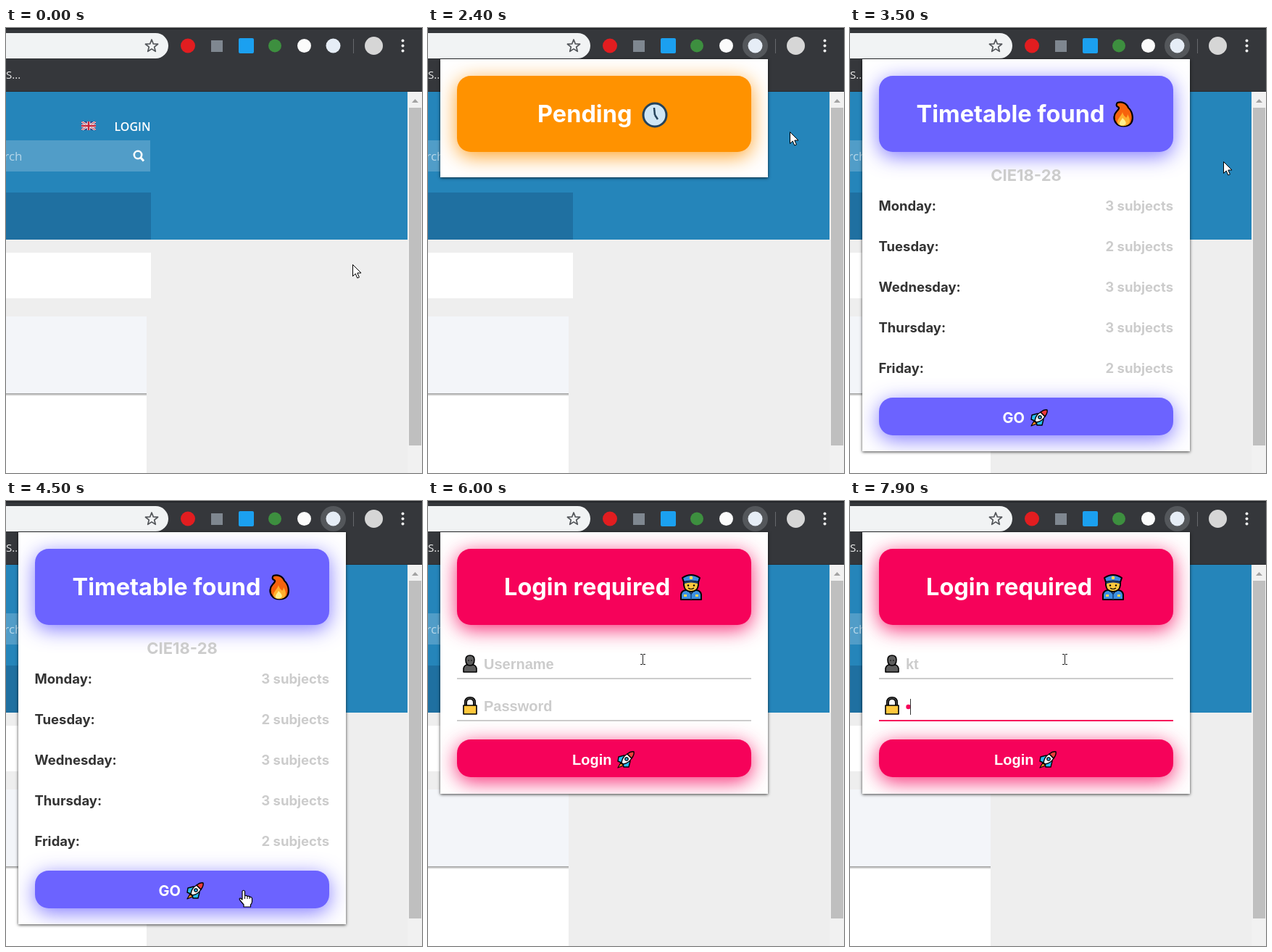
An HTML page with a canvas that plays this animation: 574x614 px, repeating every 8 s.

```html
<!DOCTYPE html>
<html lang="en">
<head>
<meta charset="utf-8">
<title>Timetable popup</title>
<style>
html, body { margin: 0; width: 100%; height: 100%; overflow: hidden; background: #eee; }
canvas { display: block; }
</style>
</head>
<body>
<canvas id="stage" width="574" height="614"></canvas>
<script>
const W = 574, H = 614, LOOP = 8000;
const stage = document.getElementById('stage').getContext('2d');
const sheet = document.createElement('canvas');
sheet.width = W;
sheet.height = H;
const popup = sheet.getContext('2d');
let c = stage;

const ORANGE = [255, 146, 0], VIOLET = [108, 99, 255], PINK = [246, 2, 90];
const GREY = '#cccccc';
const OPEN = 1400, FOUND = 2500, LOGIN = 4700;
const USER_FOCUS = 6500, PASS_FOCUS = 7500, PASS_KEY = 7800;
const USER_KEYS = [6900, 7100], USER = 'kt';

// time, x, y of the pointer's hot spot
const MOVES = [
  [0, 478, 326], [300, 478, 326], [850, 452, 24], [2000, 452, 24],
  [2600, 515, 184], [3500, 515, 184], [4300, 327, 537],
  [5000, 327, 537], [5800, 296, 218], [LOOP, 296, 218]
];

const clamp = v => Math.max(0, Math.min(1, v));
const smooth = v => v * v * (3 - 2 * v);
const easeOut = v => 1 - Math.pow(1 - clamp(v), 2.2);
const rgb = (col, a = 1) => `rgba(${col.map(Math.round).join()},${a})`;
const mix = (a, b, p) => a.map((v, i) => v + (b[i] - v) * p);

function rect(x, y, w, h, fill) {
  c.fillStyle = fill;
  c.fillRect(x, y, w, h);
}

function round(x, y, w, h, r, fill) {
  c.fillStyle = fill;
  c.beginPath();
  c.roundRect(x, y, w, h, r);
  c.fill();
}

function disc(x, y, r, fill, stroke, width = 1.5) {
  c.beginPath();
  c.arc(x, y, r, 0, Math.PI * 2);
  if (fill) { c.fillStyle = fill; c.fill(); }
  if (stroke) { c.strokeStyle = stroke; c.lineWidth = width; c.stroke(); }
}

function line(x1, y1, x2, y2, col, width) {
  c.strokeStyle = col;
  c.lineWidth = width;
  c.beginPath();
  c.moveTo(x1, y1);
  c.lineTo(x2, y2);
  c.stroke();
}

function path(d, fill, stroke, width = 1.5) {
  const p = new Path2D(d);
  c.lineJoin = 'round';
  if (fill) { c.fillStyle = fill; c.fill(p); }
  if (stroke) { c.strokeStyle = stroke; c.lineWidth = width; c.stroke(p); }
}

function text(str, x, y, font, fill, align = 'left') {
  c.font = font;
  c.fillStyle = fill;
  c.textAlign = align;
  c.fillText(str, x, y);
}

function at(x, y, draw) {
  c.save();
  c.translate(x, y);
  draw();
  c.restore();
}

const inter = (size, weight = 700) => `${weight} ${size}px Inter, sans-serif`;
const arial = '700 20px "Liberation Sans", Arial, sans-serif';
const open = (size, weight = 400) => `${weight} ${size}px "Open Sans", sans-serif`;

// ---- small pictures ----

function fire() {
  path('M6 2C12 0 19 3 21 9C26 13 29 23 25 30C21 36 8 36 4 30C0 25 1 18 5 14C8 11 9 9 7 8C4 7 4 4 6 2Z', '#f7630c', '#000', 2.2);
  path('M13 15C14 20 17 21 18 23Q20 21 20 18C24 25 24 29 21 32C17 35 11 35 7 32C3 26 11 22 13 15Z', '#ffb02e');
  path('M13 23C17 27 19 30 17 32C14 34 11 34 9 32C8 29 11 27 13 23Z', '#fff08c');
}

function rocket() {
  path('M5 16L1 23L9 20Z', '#ff8a1f', '#000', 1.2);
  path('M10 6L2 8L1 14L8 17L9 22L16 22L18 14Z', '#28bdf0', '#000', 1.4);
  path('M6 16Q7 8 14 4L20 10Q16 17 8 18Z', '#f4f4f4', '#000', 1.4);
  path('M14 4Q19 0 23 1Q24 5 20 10Z', '#ee3b3b', '#000', 1.4);
  disc(13, 11, 2.2, '#28bdf0', '#000', 1.2);
}

function officer() {
  path('M1 35V28Q2 22 9 22H21Q28 22 29 28V35Z', '#3b8fe0', '#000', 2);
  path('M11 22L15 28L19 22Z', '#2b5da8', '#000', 1);
  line(15, 27, 15, 35, '#17427e', 1.5);
  path('M5 10V15Q6 24 15 24Q24 24 25 15V10Z', '#ffc83d', '#000', 2);
  path('M3 5Q15 -3 27 5L25 11Q15 8 5 11Z', '#3b8fe0', '#000', 2);
  path('M5 11Q15 7 25 11L24 13Q15 10 6 13Z', '#1d3c6e');
  disc(15, 5, 2.3, '#ffd750');
  disc(11, 15.5, 1.2, '#000');
  disc(19, 15.5, 1.2, '#000');
  path('M11 19Q15 22 19 19', null, '#000', 1.2);
  rect(5, 28, 4, 3, '#ffd750');
  rect(21, 28, 4, 3, '#ffd750');
}

function clock() {
  disc(0, 0, 16, '#cfe6f5', '#24435c', 3);
  line(0, 0, -1, -10, '#24435c', 2.5);
  line(0, 0, 4, 6, '#24435c', 2.5);
}

function person() {
  path('M1 24V19Q2 14 7 14H13Q18 14 19 19V24Z', '#5c5c5c', '#000', 1.6);
  path('M4 7Q4 1 10 1Q16 1 16 7Q16 15 10 15Q4 15 4 7Z', '#5c5c5c', '#000', 1.6);
  disc(8, 8, 0.8, '#000');
  disc(12, 8, 0.8, '#000');
}

function lock() {
  path('M4 12V7Q4 1 10 1Q16 1 16 7V12', null, '#000', 4);
  path('M4 12V7Q4 1 10 1Q16 1 16 7V12', null, '#6d6d6d', 1);
  path('M1 11H19V23H1Z', '#ffc83d', '#000', 1.6);
}

function flag() {
  c.beginPath();
  c.rect(0, 0, 20, 12);
  c.clip();
  rect(0, 0, 20, 12, '#29337d');
  for (const [col, w] of [['#eee', 3], ['#c8283c', 1]]) {
    line(0, 0, 20, 12, col, w);
    line(0, 12, 20, 0, col, w);
  }
  for (const [col, w] of [['#eee', 4.5], ['#c8283c', 2.5]]) {
    line(10, 0, 10, 12, col, w);
    line(0, 6, 20, 6, col, w);
  }
}

// ---- browser and page ----

function browser(t) {
  rect(0, 0, W, 88, '#35373b');
  rect(0, 0, W, 2, '#232529');
  rect(0, 87, W, 1, '#2a2c2f');
  round(-40, 7, 264, 35, 17.5, '#f1f3f4');
  at(201, 25, () => {
    c.beginPath();
    for (let i = 0; i < 10; i++) {
      const r = i % 2 ? 3.9 : 9, a = -Math.PI / 2 + i * Math.PI / 5;
      c.lineTo(r * Math.cos(a), r * Math.sin(a));
    }
    c.closePath();
    c.strokeStyle = '#54575b';
    c.lineWidth = 1.7;
    c.stroke();
  });
  if (t > 800) disc(451.5, 24.5, 17.5, '#54575b');
  disc(251, 24.5, 10, '#e21d20');
  rect(283, 17, 16, 16, '#7f8790');
  round(321, 14, 21, 21, 2, '#1ba0f0');
  disc(371, 24.5, 9, '#3d8f3f');
  disc(411.5, 24.5, 9.5, '#fbfbfb');
  disc(451.5, 24.5, 10, '#e6edf6');
  rect(479, 15, 1, 20, '#67696d');
  disc(507.5, 24.5, 12.5, '#d6d6d6');
  for (const y of [17.5, 24.5, 31.5]) disc(547.5, y, 2, '#f1f1f1');
  text('S...', 0, 70, open(15), '#eeeeee');
}

function page() {
  rect(0, 88, W, H - 88, '#eeeeee');
  rect(0, 88, 554, 204, '#2585ba');
  at(104, 129, flag);
  text('LOGIN', 149.5, 142, open(16, 600), '#ffffff');
  rect(0, 155, 199, 43, '#519dc8');
  text('rch', 22.5, 183, open(17), '#b4d6e9', 'right');
  disc(182, 175, 5.2, null, '#ffffff', 2.6);
  line(186, 179, 190, 183.5, '#ffffff', 3);
  rect(0, 227, 200, 65, '#1f70a1');
  rect(0, 310, 200, 63, '#ffffff');
  rect(0, 398, 194, 106, '#f3f5f9');
  rect(0, 504, 194, 110, '#ffffff');
  const shade = c.createLinearGradient(0, 504, 0, 508);
  shade.addColorStop(0, 'rgba(0,0,0,.4)');
  shade.addColorStop(1, 'rgba(0,0,0,0)');
  rect(0, 504, 194, 4, shade);
  rect(554, 88, 20, H - 88, '#f1f1f1');
  rect(556, 110, 17, 466, '#bfbfbf');
  path('M560 103L564.5 98L569 103Z', '#a3a3a3');
}

// ---- popup ----

function glowBox(y, h, col) {
  c.save();
  c.shadowColor = rgb(col, 0.85);
  c.shadowBlur = 28;
  c.shadowOffsetY = 6;
  round(40, y, 406, h, 19, rgb(col));
  c.restore();
}

function banner(label, x, col) {
  glowBox(66, 105, col);
  text(label, x, 130, inter(32.5), '#ffffff');
}

function pending() {
  banner('Pending', 151, ORANGE);
  at(313, 120, clock);
}

function timetable(t) {
  banner('Timetable found', 91.5, mix(ORANGE, VIOLET, easeOut((t - FOUND) / 500)));
  at(363, 101, fire);
  text('CIE18-28', 243, 211, inter(22), GREY, 'center');
  const days = { Monday: 3, Tuesday: 2, Wednesday: 3, Thursday: 3, Friday: 2 };
  Object.keys(days).forEach((day, i) => {
    const y = 252 + i * 56;
    text(day + ':', 39.5, y, inter(18.5), '#333333');
    text(days[day] + ' subjects', 446, y, inter(18.5), GREY, 'right');
  });
  glowBox(510, 52, VIOLET);
  text('GO', 210.5, 545, inter(20), '#ffffff');
  at(249, 526, rocket);
}

function field(y, value, hint, focused) {
  const pink = rgb(PINK);
  text(value || hint, 77, y - 13, arial, value && focused ? pink : GREY);
  rect(40, y - 1, 406, 2, focused ? pink : GREY);
}

function caret(t, x, y, since) {
  if (Math.floor((t - since) / 500) % 2 === 0) rect(x, y, 1, 22, '#333333');
}

function login(t) {
  banner('Login required', 105, mix(VIOLET, PINK, easeOut((t - LOGIN) / 500)));
  at(348, 101, officer);
  const onUser = t >= USER_FOCUS && t < PASS_FOCUS, onPass = t >= PASS_FOCUS;
  const keys = USER_KEYS.filter(k => t >= k);
  const typed = USER.slice(0, keys.length);
  field(245, typed, 'Username', onUser);
  at(48, 212, person);
  if (onUser) {
    c.font = arial;
    caret(t, Math.round(77 + c.measureText(typed).width), 214, keys.length ? keys[keys.length - 1] : USER_FOCUS);
  }
  const filled = t >= PASS_KEY;
  field(303, '', filled ? '' : 'Password', onPass);
  at(48, 271, lock);
  if (filled) disc(80.5, 284, 3.2, rgb(PINK));
  if (onPass) caret(t, filled ? 83 : 77, 273, filled ? PASS_KEY : PASS_FOCUS);
  glowBox(329, 52, PINK);
  text('Login', 199, 364, arial, '#ffffff');
  at(261, 345, rocket);
}

function drawPopup(t) {
  const [body, height] = t < FOUND ? [pending, 163] : t < LOGIN ? [timetable, 541] : [login, 361];
  c = popup;
  c.clearRect(0, 0, W, H);
  c.save();
  c.shadowColor = 'rgba(0,0,0,.75)';
  c.shadowBlur = 4;
  c.shadowOffsetY = 1;
  rect(17, 43, 452, height, '#ffffff');
  c.restore();
  c.save();
  c.beginPath();
  c.rect(17, 43, 452, height);
  c.clip();
  body(t);
  c.restore();
  c = stage;
  const shown = clamp((t - OPEN) / 240);
  c.globalAlpha = shown;
  c.drawImage(sheet, 0, Math.round(-5 * (1 - shown)));
  c.globalAlpha = 1;
}

// ---- pointer ----

function pointerAt(t) {
  const i = MOVES.findIndex(m => m[0] > t);
  const [t0, x0, y0] = MOVES[i - 1], [t1, x1, y1] = MOVES[i];
  const p = smooth((t - t0) / (t1 - t0));
  return [x0 + (x1 - x0) * p, y0 + (y1 - y0) * p];
}

const arrow = () => path('M.5 .5V16.5L4.2 13L6.8 19L9.4 18L6.8 12H12Z', '#ffffff', '#000', 1);

function hand() {
  path('M-1 1.5Q1 -1 2.5 1.5V8Q5 6.5 6 8.5Q8.5 7.5 9.2 9.5Q12.5 9 12.5 12V16Q12 19 10.5 20V23H1V20L-4 14Q-6 11 -3.5 11L-1 13Z', '#ffffff', '#000', 1.2);
  for (const x of [2.5, 6, 9.2]) line(x, 8.5, x, 12, '#000', 1);
}

function beam() {
  rect(0, -6, 1, 13, '#222');
  for (const y of [-7, 7]) {
    rect(-3, y, 3, 1, '#222');
    rect(1, y, 3, 1, '#222');
  }
}

function pointer(t) {
  const [x, y] = pointerAt(t).map(Math.round);
  const inside = (top, bottom) => x > 40 && x < 446 && y > top && y < bottom;
  let shape = arrow;
  if (t >= FOUND && t < LOGIN && inside(510, 562)) shape = hand;
  if (t >= LOGIN && inside(329, 381)) shape = hand;
  if (t >= LOGIN && (inside(204, 246) || inside(262, 304))) shape = beam;
  at(x, y, shape);
}

const start = performance.now();

function frame() {
  const t = (performance.now() - start) % LOOP;
  page();
  browser(t);
  if (t > OPEN) drawPopup(t);
  pointer(t);
  requestAnimationFrame(frame);
}

frame();
</script>
</body>
</html>
```
